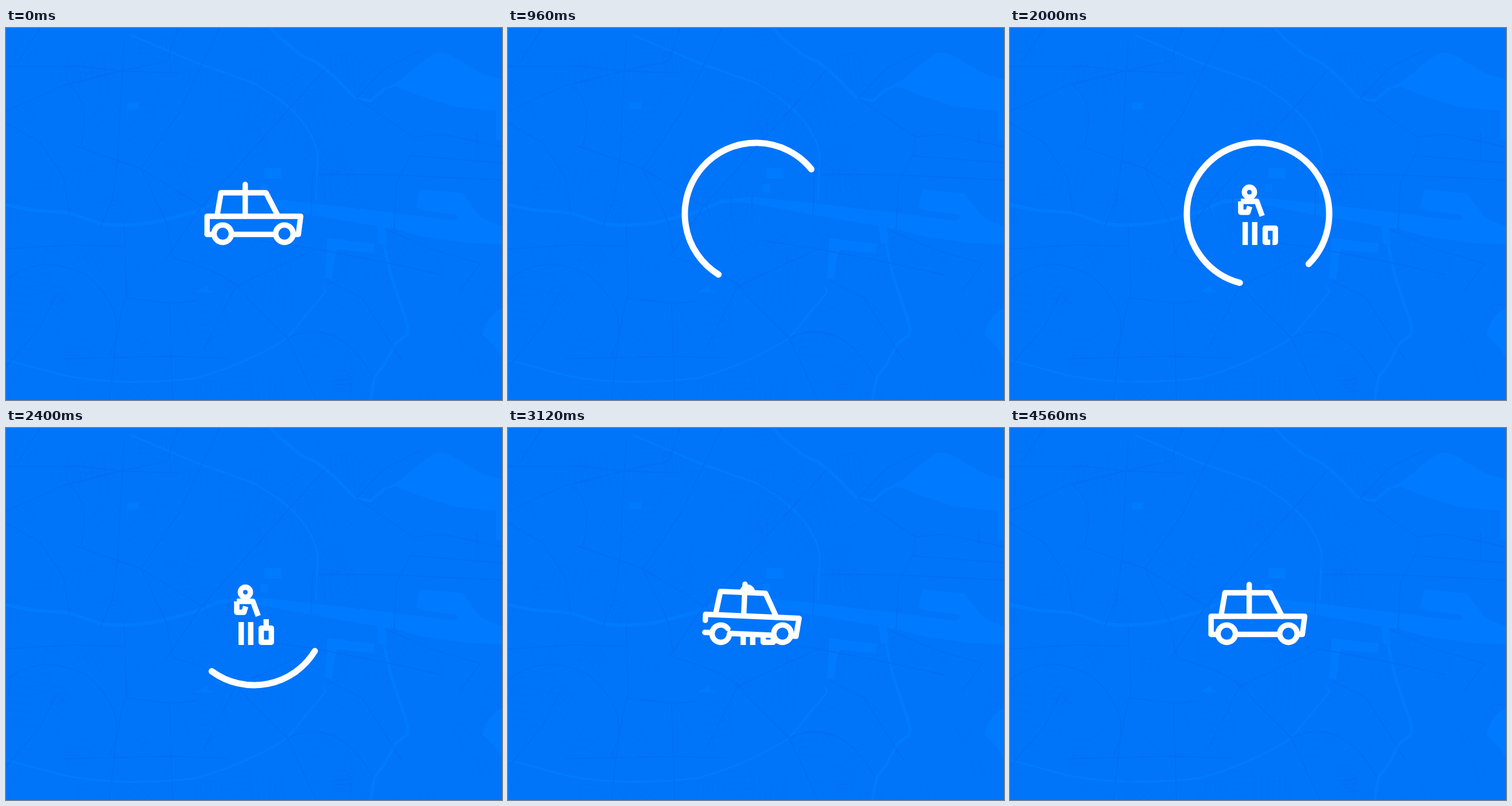
Animation, 864 px wide and 648 px high, one loop 4600 ms. Source, as an HTML page:

```html
<!DOCTYPE html>
<html lang="en">
<head>
<meta charset="utf-8">
<title>Taxi loader</title>
<style>
  html, body { margin: 0; width: 100%; height: 100%; overflow: hidden; background: #0075fa; }
  svg { display: block; width: 864px; height: 648px; }
  .line { fill: none; stroke: #fff; stroke-width: 9.4; stroke-linejoin: round; stroke-linecap: round; }
  .flat { stroke-linecap: butt; }
  .base { fill: #0075fa; }
  .water { fill: #007bff; }
  .stream { fill: none; stroke: #007bff; stroke-linejoin: round; }
  .road { fill: none; stroke: #006ff0; stroke-width: 2.4; stroke-linejoin: round; opacity: .75; }
  .street { fill: none; stroke: #0071f3; stroke-width: 1; opacity: .75; }
</style>
</head>
<body>
<svg viewBox="0 0 864 648">
  <rect class="base" width="864" height="648"/>
  <path id="streets" class="street"/>
  <g class="water">
    <path d="M657 108L690 88L716 66L746 44Q764 40 782 52L830 80L864 90V145L780 137L720 118L680 102Z"/>
    <path d="M365 300L425 294L530 305L676 322L780 336Q792 332 785 325L730 318L714 312L722 281L795 288L826 328L848 343L832 333L864 346V377L800 374L720 362L676 350L530 325L430 306Z"/>
    <path d="M560 366L643 376L640 392L577 386L572 404L568 438L556 436Z"/>
    <path d="M864 487Q835 505 830 535Q850 550 864 575Z"/>
    <path d="M854 145h10v50h-10zM212 130l20 -1v12l-20 1zM450 244h30v18h-30zM444 272h12v14h-12zM330 460l20 -10l4 8l14 2z"/>
  </g>
  <g class="stream">
    <path stroke-width="6" d="M0 308L45 317L110 322L165 341Q210 348 270 336L330 320L370 303L420 299"/>
    <path stroke-width="5" d="M461 0L480 20L515 48L542 60L575 88L608 122L635 127L662 104"/>
    <path stroke-width="14" d="M652 338L657 375"/>
    <path stroke-width="5" d="M656 365L670 430L690 490Q704 525 698 535L678 550L660 585L642 608L635 648"/>
    <path stroke-width="3" d="M217 12L330 60L430 95Q530 150 543 220L540 300M0 578L100 605Q200 625 330 610Q420 585 490 540L556 460L552 450"/>
  </g>
  <g class="road">
    <path d="M0 67H130L200 75L300 78M206 20L200 120L195 225L185 300L165 345M0 145L100 100L200 75L280 58L300 0"/>
    <path d="M372 0L300 150L235 245L280 340L290 400M555 72L440 200L340 312L280 400M120 205L235 245L345 312"/>
    <path d="M610 122L710 190V212L680 270L676 352M710 190L760 185L864 207M700 222L864 235M545 255L680 256L864 265M610 122L660 70L720 40M820 180V230"/>
    <path d="M534 250L531 325M425 290V340M388 296V330M345 305L352 330M440 370L540 385L660 408L760 430M660 350L740 385L826 410L790 460"/>
    <path d="M206 345L210 460L200 500L190 560L180 648M0 385L110 378L205 380M210 470L290 480L330 475M290 400Q400 430 420 470L490 540L540 648M285 480L290 648M100 576L280 572L385 575"/>
    <path d="M0 440Q60 390 140 430Q220 500 180 570M0 590L60 520L90 460M345 560L400 450L540 385M490 540Q580 500 640 610M560 440L620 470L690 580"/>
    <path d="M0 165L60 200L100 260L110 322M20 60L60 0M130 205Q150 130 110 100"/>
  </g>

  <path id="ring" class="line" style="stroke-width:11"/>

  <g id="rider" class="line flat">
    <g id="upper">
      <path id="arm"/>
      <path id="torso" d="M402 302H430L439.3 327.3"/>
      <circle id="head" cx="417" cy="286" r="8.7"/>
    </g>
    <g id="lower">
      <path id="legA" d="M409.7 378V338"/>
      <path id="legB" d="M426.3 378V338"/>
      <path id="bag" d="M453.3 373.3H444.6V348.6H462.2V373.3H453.3"/>
      <path id="grip" d="M453.2 345V333"/>
    </g>
  </g>

  <g id="car">
    <g id="body">
      <path id="fill" class="base" d="M350 328H368L374.5 287H453L474 328H513.5L509.5 359.5H350Z"/>
      <g class="line">
        <path id="hull" d="M500 359.5H509.3L513.3 328H350.3V359.5"/>
        <path id="axle" d="M485 359.5H350.3"/>
        <path id="roof" d="M474 328L453 287H374.5L367.5 328"/>
        <path id="mast" d="M416.7 272.5V328"/>
      </g>
    </g>
    <g id="hubs" class="base"><circle cx="377.5" cy="358.3" r="15"/><circle cx="485" cy="358.3" r="15"/></g>
    <g class="line">
      <circle id="rear" cx="377.5" cy="358.3" r="15.2"/>
      <circle id="front" cx="485" cy="358.3" r="15.2"/>
    </g>
  </g>
</svg>
<script>
const LOOP = 4600;
const $ = id => document.getElementById(id);
const clamp = v => Math.min(1, Math.max(0, v));
const span = (t, a, b) => clamp((t - a) / (b - a));
const ease = v => v * v * (3 - 2 * v);
const show = (el, on) => el.setAttribute('visibility', on ? 'inherit' : 'hidden');

function drawStreets() {
  let seed = 77, d = '';
  const rnd = () => (seed = (seed * 16807) % 2147483647) / 2147483647;
  for (let i = 0; i < 190; i++) {
    const x = rnd() * 864, y = rnd() * 648;
    if (x > 640 && y < 400 && rnd() < .75) continue;
    const a = rnd() * Math.PI, len = 18 + rnd() * 45, gap = 6 + rnd() * 9, n = 2 + rnd() * 4;
    const c = Math.cos(a), s = Math.sin(a);
    for (let k = 0; k < n; k++)
      d += `M${(x - s * gap * k).toFixed(1)} ${(y + c * gap * k).toFixed(1)}l${(c * len).toFixed(1)} ${(s * len).toFixed(1)}`;
    d += `M${x.toFixed(1)} ${y.toFixed(1)}l${(-s * gap * n).toFixed(1)} ${(c * gap * n).toFixed(1)}`;
  }
  $('streets').setAttribute('d', d);
}

// Monotone cubic through [time, value] pairs
function curve(keys) {
  const n = keys.length - 1;
  const rate = i => (keys[i + 1][1] - keys[i][1]) / (keys[i + 1][0] - keys[i][0]);
  const slope = keys.map((_, i) => {
    if (i === 0 || i === n) return 0;
    const p = rate(i - 1), q = rate(i);
    return p * q <= 0 ? 0 : 2 * p * q / (p + q);
  });
  return t => {
    if (t <= keys[0][0]) return keys[0][1];
    if (t >= keys[n][0]) return keys[n][1];
    let i = 0;
    while (t > keys[i + 1][0]) i++;
    const h = keys[i + 1][0] - keys[i][0], u = (t - keys[i][0]) / h, e = ease(u);
    return keys[i][1] * (1 - e) + keys[i + 1][1] * e
      + h * u * (1 - u) * (slope[i] * (1 - u) - slope[i + 1] * u);
  };
}

const tail = curve([[540, -18], [760, 4], [960, 38.8], [1120, 64], [1600, 204.7], [2000, 315], [2240, 440], [2400, 592.9], [2640, 720]]);
const head = curve([[540, -18], [580, 20], [760, 108], [960, 237.5], [1120, 384], [1600, 557.3], [2000, 615], [2400, 688.5], [2640, 722]]);

function trim(id, a, b) {
  const el = $(id);
  show(el, b - a > .002);
  if (b - a > .998) {
    el.removeAttribute('stroke-dasharray');
    return;
  }
  el.setAttribute('pathLength', 100);
  el.setAttribute('stroke-dasharray', `${(b - a) * 100} 300`);
  el.setAttribute('stroke-dashoffset', -a * 100);
}

const polar = deg => {
  const r = deg * Math.PI / 180;
  return `${432 + 124 * Math.cos(r)} ${324 - 124 * Math.sin(r)}`;
};

function drawRing(t) {
  const a = tail(t), b = head(t), on = t > 540 && t < 2640 && b - a > .5;
  show($('ring'), on);
  if (!on) return;
  const m = (a + b) / 2;
  $('ring').setAttribute('d', `M${polar(a)}A124 124 0 0 0 ${polar(m)}A124 124 0 0 0 ${polar(b)}`);
}

function drawRider(t) {
  const on = t > 1280 && t < 3340;
  show($('rider'), on);
  if (!on) return;
  trim('legA', 0, ease(span(t, 1290, 1520)));
  trim('legB', 0, ease(span(t, 1340, 1570)));
  trim('torso', 0, .48 * span(t, 1540, 1600) + .52 * span(t, 1600, 1740));
  trim('head', 0, ease(span(t, 1680, 1920)));
  trim('bag', 0, ease(span(t, 1740, 2040)));
  trim('grip', 0, ease(span(t, 2000, 2120)));

  const bend = ease(span(t, 1620, 1900));
  const fore = (1 - bend) * 1.46, hand = 1.4 - 2.68 * bend;
  const reach = 2.5 + 8 * bend;
  const x = 402 + 12.5 * Math.cos(fore), y = 321 + 12.5 * Math.sin(fore);
  $('arm').setAttribute('d', `M402 302V321L${x} ${y}L${x + reach * Math.cos(hand)} ${y + reach * Math.sin(hand)}`);
  trim('arm', 0, span(t, 1460, 1570));

  const board = ease(span(t, 3125, 3320));
  $('upper').setAttribute('transform', `translate(0 ${28 * board})`);
  $('lower').setAttribute('transform', `translate(0 ${-20 * board})`);
}

function drawCar(t) {
  const leaving = t < 600;
  show($('car'), leaving || t > 2540);
  let dx, tilt;
  if (leaving) {
    dx = 11 * (t / 320) ** 2.5;
    tilt = -2.8 * ease(span(t, 20, 310));
    const cut = (id, a, b, p) => trim(id, span(t, a, b) ** p, 1);
    cut('hull', 250, 575, 2);
    cut('front', 250, 560, 1.3);
    cut('roof', 305, 570, 1.5);
    cut('mast', 340, 570, 1.5);
    cut('axle', 335, 575, 1.5);
    cut('rear', 345, 580, 1.3);
  } else {
    dx = -7 * (Math.max(0, 3300 - t) / 180) ** 2.5;
    const s = t - 3090;
    tilt = s < 0 ? 3 * ease(span(t, 2640, 3090))
      : 3 * Math.exp(-s / 220) * Math.cos(2 * Math.PI * s / 560);
    const grow = (id, a, b) => trim(id, 0, span(t, a, b));
    grow('hull', 2550, 3177);
    grow('front', 2550, 2860);
    grow('roof', 2600, 3060);
    grow('mast', 2760, 3040);
    grow('axle', 2580, 3110);
    grow('rear', 2820, 3153);
  }
  const solid = t < 420 || t > 2680;
  show($('fill'), solid);
  show($('hubs'), solid);
  $('car').setAttribute('transform', `translate(${dx} 0)`);
  $('body').setAttribute('transform', `rotate(${tilt} 432 345)`);
}

function frame(now) {
  const t = now % LOOP;
  drawRing(t);
  drawRider(t);
  drawCar(t);
  requestAnimationFrame(frame);
}

drawStreets();
const start = performance.now();
const tick = () => frame(Math.max(0, performance.now() - start));
frame(0);
</script>
</body>
</html>
```
